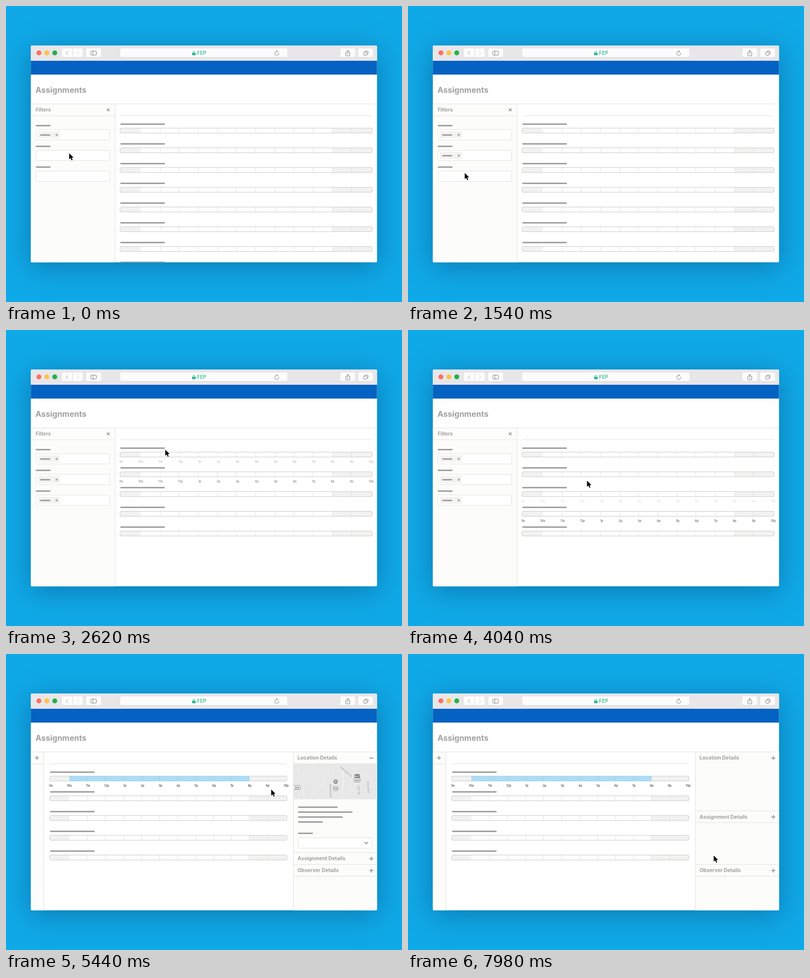
Write an HTML page with a canvas that moves like this. It is 800 by 600 pixels and loops after 8000 ms.

```html
<!DOCTYPE html>
<html lang="en">
<head>
<meta charset="utf-8">
<title>Assignments</title>
<style>
  html, body { margin: 0; width: 100%; height: 100%; overflow: hidden; background: #10a9e7; }
  canvas { display: block; }
</style>
</head>
<body>
<canvas id="stage" width="800" height="600"></canvas>
<script>
const ctx = document.getElementById('stage').getContext('2d');
const LOOP = 8000;
const GRAY = '#a1a1a1', LINE = '#e2e2e2', PANEL = '#fcfcfb', ICON = '#808080', GREEN = '#2ab88a';
const FILTER_CLICKS = [660, 1680], ROW_CLICK = 4780, DETAILS_CLICK = 7640;
const ROW_TOP = 239, ROW_STEP = 40;
const REMOVED = [[1, 3], [4, 7]]; // rows dropped by each filter click
const HOURS = Array.from({ length: 14 }, (_, i) => `${(i + 8) % 12 + 1}${i < 3 ? 'a' : 'p'}`);

// Stops of the cursor tip: time, x, y
const STOPS = [
  [0, 127, 298], [660, 127, 298], [820, 117, 302], [1460, 114, 338], [1680, 114, 338],
  [2320, 225, 306], [2620, 321, 242], [3820, 358, 366], [4040, 361, 305], [4640, 362, 250],
  [4780, 362, 250], [5440, 535, 274], [6400, 614, 381], [7000, 623, 416], [7460, 617, 408], [LOOP, 617, 408]
];

const part = (t, start, length) => Math.min(1, Math.max(0, (t - start) / length));
const easeOut = p => 1 - (1 - p) ** 2.5;
const smooth = p => p * p * (3 - 2 * p);
const mix = (a, b, p) => a + (b - a) * p;
const random = seed => Math.abs(Math.sin(seed * 12.9898) * 43758.5453) % 1;
const filterProgress = (t, n) => easeOut(part(t, FILTER_CLICKS[n], 306));

// Smooth curve through the stops, standing still between equal ones
function cursorAt(t) {
  const i = Math.max(0, STOPS.findIndex(s => t < s[0]) - 1);
  const same = (a, b) => a[1] === b[1] && a[2] === b[2];
  const slope = (n, axis) => {
    const [a, b, c] = [STOPS[n - 1], STOPS[n], STOPS[n + 1]];
    return !a || !c || same(a, b) || same(b, c) ? 0 : (c[axis] - a[axis]) / (c[0] - a[0]);
  };
  const a = STOPS[i], b = STOPS[i + 1], span = b[0] - a[0], p = (t - a[0]) / span;
  return [1, 2].map(axis => mix(a[axis], b[axis], smooth(p)) +
    span * p * (1 - p) * (slope(i, axis) * (1 - p) - slope(i + 1, axis) * p));
}

function hoveredRow(t) {
  if (t > 4640) return 0;
  const [x, y] = cursorAt(Math.max(0, t));
  return x < 230 ? -1 : Math.max(0, Math.floor((y - ROW_TOP + 10) / ROW_STEP));
}

function withAlpha(alpha, draw) {
  if (alpha <= 0) return;
  ctx.save();
  ctx.globalAlpha *= alpha;
  draw();
  ctx.restore();
}

function clipTo(x, y, w, h, draw) {
  ctx.save();
  ctx.beginPath();
  ctx.rect(x, y, w, h);
  ctx.clip();
  draw();
  ctx.restore();
}

function rect(x, y, w, h, fill) {
  ctx.fillStyle = fill;
  ctx.fillRect(x, y, w, h);
}

function box(x, y, w, h, r, fill, stroke) {
  ctx.beginPath();
  ctx.roundRect(x, y, w, h, r);
  if (fill) { ctx.fillStyle = fill; ctx.fill(); }
  if (stroke) { ctx.strokeStyle = stroke; ctx.lineWidth = 1; ctx.stroke(); }
}

function arc(x, y, r, { fill, stroke, from = 0, to = 7 }) {
  ctx.beginPath();
  ctx.arc(x, y, r, from, to);
  if (fill) { ctx.fillStyle = fill; ctx.fill(); }
  if (stroke) { ctx.strokeStyle = stroke; ctx.lineWidth = 1; ctx.stroke(); }
}

function path(points, color, width = 1) {
  ctx.beginPath();
  for (const [x, y] of points) ctx.lineTo(x, y);
  ctx.strokeStyle = color;
  ctx.lineWidth = width;
  ctx.stroke();
}

const hline = (x, y, end, color = LINE) => path([[x, y], [end, y]], color);
const vline = (x, y, end, color = LINE) => path([[x, y], [x, end]], color);
const bar = (x, y, w) => box(x, y - 1.5, w, 3, 1.2, GRAY);

function text(str, x, y, size, color, weight = 700, align = 'left') {
  ctx.font = `${weight} ${size}px Inter, sans-serif`;
  ctx.fillStyle = color;
  ctx.textAlign = align;
  ctx.fillText(str, x, y);
}

function cross(x, y, r, width) {
  path([[x - r, y - r], [x + r, y + r]], GRAY, width);
  path([[x - r, y + r], [x + r, y - r]], GRAY, width);
}

function toggle(x, y, open) {
  rect(x - 4, y - 1, 8, 2, GRAY);
  if (!open) rect(x - 1, y - 4, 2, 8, GRAY);
}

function drawToolbar() {
  rect(50, 80, 700, 31, '#e8e6e8');
  ['#fc7062', '#fcc24a', '#24b14b'].forEach((color, i) => arc(66.5 + 16 * i, 95, 5, { fill: color }));
  for (const [x, w] of [[113, 42], [162, 30], [231, 337.5], [675.5, 30], [711.5, 30]]) {
    box(x, 86.5, w, 18, 3, '#d4d2d4');
    box(x, 86, w, 17.7, 3, '#fcfcfc');
  }
  vline(134.5, 86, 104, '#dedede');
  path([[124.5, 92], [121.3, 95.5], [124.5, 99]], '#929292');
  path([[143.5, 92], [146.7, 95.5], [143.5, 99]], '#d0d0d0');

  box(171.5, 91.5, 11, 8, 1, null, ICON);
  vline(175.5, 91.5, 99.5, ICON);

  box(376, 94.8, 7, 5, .8, GREEN);
  box(377.5, 91.7, 4, 5, 2, null, GREEN);
  text('FEP', 386, 99.2, 10, GREEN, 500);

  arc(547, 96, 4, { stroke: ICON, from: -.3, to: 4.9 });
  path([[546.5, 90], [549, 92], [546.5, 94]], ICON);

  box(686.5, 93.5, 8, 7.5, .5, null, ICON);
  rect(689, 92.5, 3, 2, '#fcfcfc');
  vline(690.5, 89.8, 98, ICON);
  path([[688.3, 92], [690.5, 89.8], [692.7, 92]], ICON);

  box(724.5, 91.5, 7, 6, 1, null, ICON);
  box(722.5, 93.5, 7, 6, 1, '#fcfcfc', ICON);
}

function drawFilters(t, shrink) {
  const edge = mix(220.5, 76.5, shrink);
  clipTo(50, 199, edge - 50, 321, () => {
    rect(50, 199, 171, 321, PANEL);
    withAlpha(1 - shrink, () => {
      text('Filters', 60, 214, 10, GRAY);
      cross(edge - 14, 210.5, 2.7, 1.9);
      [1, filterProgress(t, 0), filterProgress(t, 1)].forEach((chip, i) => {
        const y = 242.5 + 42 * i;
        bar(60, y, 30);
        box(60.5, y + 8, 149, 21, 1, '#fff', LINE);
        withAlpha(chip, () => {
          box(64, y + 11.5, 45, 14, 1, '#f3f3f2');
          bar(69, y + 19, 20.5);
          cross(102.5, y + 18.7, 2, 1.6);
        });
      });
    });
    withAlpha(shrink, () => toggle(62.5, 210.5, false));
  });
  hline(50, 222.5, edge);
  vline(edge, 199, 520);
}

function drawRow(y, left, width, selected) {
  const cell = i => Math.floor(left + width * (.0835 + .0758 * i));
  const top = y + 8, end = left + width;
  bar(left + 1, y + .5, 90);
  box(left + .5, top + .5, width - 1, 10, 2, '#fff');
  rect(left + 1, top + 1, cell(0) - left - 1, 9.5, '#f2f2f1');
  rect(cell(10), top + 1, end - cell(10) - 1, 9.5, '#f2f2f1');
  for (let i = 1; i < 12; i++) vline(cell(i) + .5, top + 1, top + 10, '#e1e1e1');
  box(left + .5, top + .5, width - 1, 10, 2, null, '#cbcbcb');
  withAlpha(selected, () => {
    box(cell(0) + .5, top + .5, cell(10) - cell(0), 10, 0, '#abdcf6', '#a2d5ef');
    for (let i = 1; i < 10; i++) vline(cell(i) + .5, top + 1, top + 10, '#98cfec');
  });
}

// Hour names spread with equal gaps between them
function drawHours(y, left, width) {
  ctx.font = '500 6px Inter, sans-serif';
  const sizes = HOURS.map(hour => ctx.measureText(hour).width);
  const gap = (width + 4 - sizes.reduce((a, b) => a + b)) / (HOURS.length - 1);
  let x = left - 1;
  HOURS.forEach((hour, i) => {
    text(hour, x, y, 6, '#444', 500);
    x += sizes[i] + gap;
  });
}

function drawRows(t, shrink) {
  const left = mix(230, 88, shrink), width = mix(740, 568, shrink) - left;
  hline(left, 222.5, left + width - 1, '#e0e0e0');
  const rows = Array.from({ length: 9 }, (_, i) => {
    let slot = i, alpha = 1;
    REMOVED.forEach((set, n) => {
      const gone = filterProgress(t, n);
      slot -= gone * set.filter(r => r < i).length;
      if (set.includes(i)) alpha = 1 - gone;
    });
    return { y: Math.round(ROW_TOP + ROW_STEP * slot), alpha, selected: i ? 0 : shrink };
  });
  rows.sort((a, b) => a.alpha - b.alpha);
  for (const { y, alpha, selected } of rows) withAlpha(alpha, () => drawRow(y, left, width, selected));

  // The hours follow the hovered row after a delay, with a cross-fade
  const samples = Array.from({ length: 15 }, (_, i) => hoveredRow(t - 100 - 10 * i));
  for (const row of new Set(samples)) {
    const share = samples.filter(r => r === row).length / samples.length;
    if (row >= 0) withAlpha(smooth(share), () => drawHours(ROW_TOP + 30 + ROW_STEP * row, left, width));
  }
}

function drawSign(str, x, y, w, fill = '#fff', ink = '#555') {
  box(x - w / 2, y - 4, w, 8, 2, fill, '#858585');
  text(str, x, y + 2, 5, ink, 700, 'center');
}

function drawMap() {
  clipTo(581, 222.5, 169, 72, () => {
    rect(581, 222, 169, 73, '#e8e8e8');
    const streets = Array.from({ length: 14 }, (_, i) => {
      const x = 560 + 15 * i, lean = mix(-40, 50, random(i + 1)), bend = mix(-9, 9, random(i + 30));
      return Array.from({ length: 10 }, (_, k) => [x + lean * k / 9 + bend * Math.sin(k / 2), 222 + 8 * k]);
    });
    for (const street of streets) path(street, '#dadada', 2.4);
    for (const street of streets) path(street, '#f5f5f5', 1.4);
    ['Fenwold Av', 'Elmo Ave', 'Tarn Dr', 'Birkenway'].forEach((name, i) => {
      ctx.save();
      ctx.translate([686, 730, 711, 654][i], [240, 270, 276, 278][i]);
      ctx.rotate(i ? 1.5 : .7);
      text(name, 0, 0, 5.5, '#999', 400, 'center');
      ctx.restore();
    });
    drawSign('1141', 587.5, 270.5, 14);
    drawSign('ALT', 709.5, 248, 10, '#777', '#fff');
    drawSign('401', 709.5, 255.5, 12);
    drawSign('59', 666, 273, 9);
    arc(666, 258.5, 4.2, { fill: '#707070' });
    arc(666, 258, 2.4, { fill: '#fff' });
    arc(666, 257.5, 1.1, { fill: '#555' });
  });
}

function drawDetails(t, shrink) {
  if (!shrink) return;
  const second = mix(402.5, 222.5, smooth(part(t, DETAILS_CLICK + 220, 252)));
  const header = (title, top, open) => {
    text(title, 589, top + 15.8, 10.2, GRAY);
    toggle(738, top + 12.5, open);
  };
  ctx.save();
  ctx.translate(170 * (1 - shrink), 0);
  rect(580, 199, 170, 321, PANEL);
  vline(580.5, 199, 520);
  withAlpha(1 - part(t, DETAILS_CLICK, 200), () => {
    hline(581, 222.5, 750);
    drawMap();
    [80, 110, 90, 50].forEach((w, i) => bar(590, 310.5 + 10 * i, w));
    bar(590, 363.5, 30);
    box(590.5, 372.5, 149, 21, 1, '#fff', LINE);
    path([[724.5, 381], [728, 384.8], [731.5, 381]], GRAY, 2);
  });
  header('Location Details', 198.5, t < DETAILS_CLICK);
  header('Assignment Details', second, false);
  header('Observer Details', 426.5, false);
  for (const y of [second, second + 24, 426.5, 450.5]) hline(581, y, 750);
  ctx.restore();
}

function drawCursor(t) {
  const [x, y] = cursorAt(t);
  ctx.save();
  ctx.translate(x + .6, y + .6);
  ctx.scale(.9, .9);
  ctx.beginPath();
  for (const p of [[0, 0], [0, 13.6], [3.2, 10.8], [5.6, 16], [7.8, 15], [5.6, 10], [9.8, 9.7]]) ctx.lineTo(...p);
  ctx.closePath();
  ctx.strokeStyle = '#fff';
  ctx.lineWidth = 1.6;
  ctx.stroke();
  ctx.fillStyle = '#000';
  ctx.fill();
  ctx.restore();
}

function drawWindow(t) {
  const shrink = smooth(part(t, ROW_CLICK, 400));
  ctx.save();
  ctx.shadowColor = 'rgba(0, 50, 100, .4)';
  ctx.shadowBlur = 58;
  ctx.shadowOffsetY = 9;
  box(50.2, 80.3, 699.3, 439.2, 2, '#fff');
  ctx.restore();

  ctx.save();
  ctx.clip(); // keeps to the window outline drawn last
  drawToolbar();
  rect(50, 111, 700, 28, '#0462c2');
  text('Assignments', 59.5, 176, 16, GRAY);
  drawRows(t, shrink);
  drawFilters(t, shrink);
  drawDetails(t, shrink);
  hline(50, 198.5, 750);
  ctx.restore();
}

function frame(now) {
  const t = now % LOOP;
  rect(0, 0, 800, 600, '#10a9e7');
  drawWindow(t);
  drawCursor(t);
  requestAnimationFrame(frame);
}
requestAnimationFrame(frame);
</script>
</body>
</html>
```
